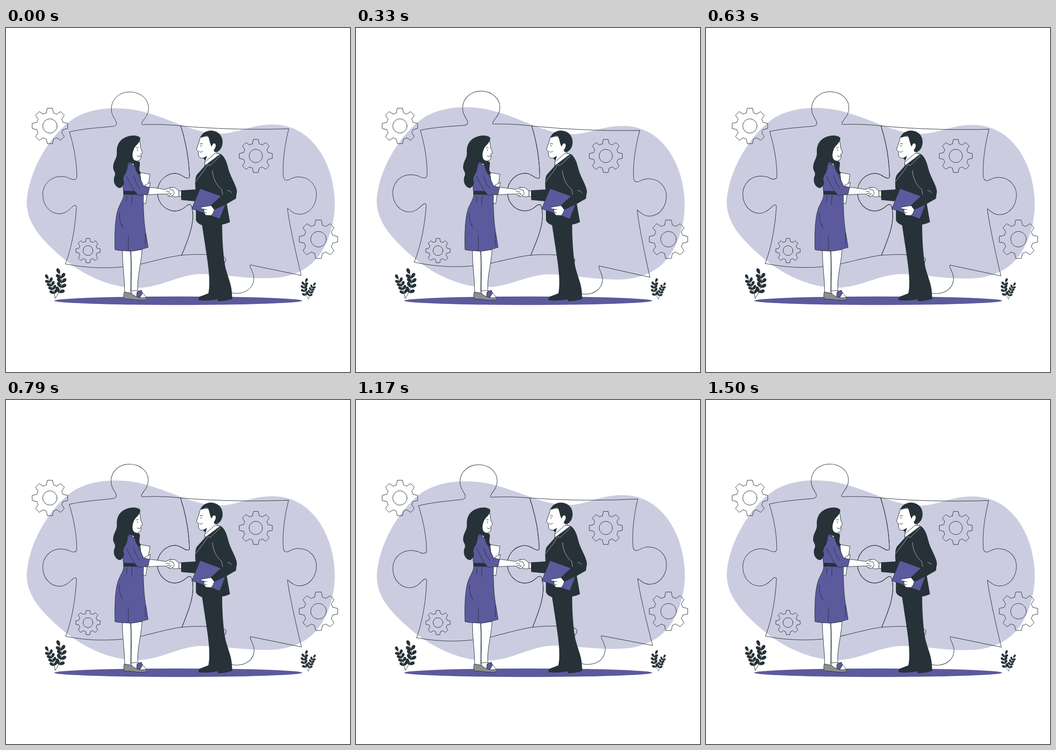
These frames come from a looping animation (748 by 748 pixels, 1540 ms). An HTML page:

```html
<!DOCTYPE html>
<html lang="en">
<head>
<meta charset="utf-8">
<title>Handshake</title>
<style>
  html, body { margin: 0; width: 100%; height: 100%; overflow: hidden; background: #fff; }
  svg { display: block; width: 100%; height: 100%; }
  .line { fill: none; stroke: #263238; stroke-width: 1; stroke-linecap: round; stroke-linejoin: round; }
  .skin { fill: #fff; stroke: #263238; stroke-width: 1; stroke-linejoin: round; }
  .dark { fill: #263238; }
  .main { fill: #5b5a9d; }
  .edge { stroke: #263238; stroke-width: 1; stroke-linejoin: round; }
  .pale { fill: none; stroke: #d5d5e4; stroke-width: .8; stroke-linecap: round; }
</style>
</head>
<body>
<svg viewBox="0 0 748 748">
  <path id="blob" fill="#cbcce0" d="M45 380C48 310 98 228 150 195C180 178 225 168 285 179C350 193 395 223 450 229C500 234 525 210 580 210C650 210 690 265 706 320C718 365 717 400 708 435C690 500 655 535 590 543C530 548 470 534 420 535C370 538 330 568 275 565C218 562 162 533 121 498C75 458 46 425 45 380Z"/>

  <g id="puzzle" class="line">
    <path d="M138 226C165 219 200 217 232 214Q242 213 240 205C236 195 229 190 229 175C230 153 248 139 269 139C292 139 310 154 310 174C310 190 300 197 296 205Q293 211 299 210C325 209 355 210 380 213"/>
    <path d="M138 226C149 262 154 295 154 323C154 331 146 331 138 327C131 323 124 323 117 323C96 324 80 341 80 362C80 386 96 404 117 404C134 403 141 390 148 386Q154 384 153 391C151 430 143 478 129 513C190 525 245 523 290 514C322 507 350 498 382 494"/>
    <path id="seam" d="M380 213C392 250 398 290 399 322C399 329 393 327 386 323C380 319 374 316 367 316C346 317 329 335 329 357C330 381 347 398 368 398C385 397 391 386 397 384Q402 382 404 389C412 420 398 455 382 494"/>
    <use href="#seam"/>
    <path d="M380 213C450 219 530 222 615 219C606 253 601 292 603 322C604 332 610 333 617 329C625 325 632 323 639 324C660 325 675 342 675 362C675 386 659 405 638 405C625 405 618 396 612 392C614 415 629 485 642 538L531 515C528 520 539 530 539 545C538 565 522 577 500 577C475 576 460 560 460 540C461 520 480 512 478 502C474 491 415 491 382 494"/>
  </g>

  <g id="gears" class="line"></g>
  <ellipse class="main" cx="374.500" cy="593" rx="269.500" ry="9.200"/>
  <g id="plants"></g>

  <g id="woman">
    <path class="skin" d="M253 484C253 515 258 545 258 574L272 579C274 548 272 515 272 484ZM270 484C274 515 270 545 271 573L287 574C284 545 293 520 296 482Z"/>
    <path class="edge" fill="#8d8d91" d="M257 574C256 579 255 585 258 589L273 590C282 591 296 593 304 591Q308 588 304 585C292 588 281 582 275 577Z"/>
    <path class="skin" d="M271 573C281 569 291 571 297 576L305 585C294 590 280 584 274 578Z"/>
    <path class="main edge" d="M285 574L294 570L297 576L291 586L284 583Z"/>
    <path class="skin" d="M290 314L313 318L304 382L287 379Z"/>
    <path class="skin" d="M302 342L309 338L314 336L312 345L315 349L303 350Z"/>
    <path class="main edge" d="M266 291C278 293 286 299 289 308C294 321 292 338 298 355L299 364C298 390 300 430 305 452L309 477C291 482 280 486 266 485C252 484 245 484 237 482C236 445 237 405 247 386C251 377 256 370 256 361L253 333C252 312 258 300 266 291Z"/>
    <path class="dark" d="M256 354L298 355L299 363L255 362Z"/>
    <path class="line" d="M247 402C246 415 248 426 255 435M249 425L253 429M266 452L266 483M303 446L303 472M263 365L262 378M274 364L273 384"/>
    <path class="skin" d="M307 346C324 347 337 350 348 351L357 346L368 354L367 362L357 367L347 361C335 361 319 362 302 363Z"/>
    <path class="main edge" d="M266 296C278 293 283 303 288 319L299 343L312 347L309 361L288 364C277 354 270 338 262 322"/>
    <path class="line" d="M277 321L284 339L291 349"/>
    <path class="skin" d="M274 285L275 299Q282 298 287 288L290 288Q294 284 294 279L293 274L297 271L293 261L291 246L270 250Z"/>
    <path class="dark" d="M292 239C288 234 276 232 264 236C248 241 240 254 241 270C242 283 234 288 233 301C232 310 238 311 237 320C232 330 235 341 242 346Q249 351 253 344Q259 338 255 330C255 319 262 317 263 308C266 302 263 297 267 293C275 291 280 297 281 306Q284 315 288 318Q293 320 293 314C287 309 292 302 291 292Q288 289 281 288C274 285 274 274 277 266C280 254 292 252 292 239Z"/>
    <path class="line" d="M283 261Q286 259 288 260M286 264L286 267M285 278Q289 281 293 278"/>
  </g>

  <g id="man">
    <path class="skin" d="M423 236L419 250L414 264L418 268L419 278Q421 284 428 283L433 284L432 301L458 283L460 259L451 235Z"/>
    <path class="dark" d="M423 238C425 230 434 223 446 223C462 224 471 234 471 248C471 259 465 269 456 270Q449 268 454 262C457 257 455 250 450 252L447 258C443 251 443 243 439 235C434 232 429 239 423 238ZM428 283L437 278L434 288Z"/>
    <path fill="#fff" d="M450 252Q456 249 456 256Q455 263 450 263Z"/>
    <path class="line" d="M422 252Q425 250 428 252M424 255L424 258M420 268Q423 272 428 268"/>
    <path class="dark" d="M425 420L470 426C470 465 473 500 477 520C482 541 490 556 491 574L492 589Q477 594 461 594L460 590Q440 594 419 592Q416 585 427 582L440 577C445 553 440 520 436 492Z"/>
    <path class="dark" d="M467 274C476 280 480 292 483 304C487 322 500 340 502 354C502 371 490 376 480 382L487 422C474 428 455 432 430 430Q416 426 413 418L413 377L381 374L381 353L412 351C411 335 411 326 415 319L432 300Z"/>
    <path class="skin" d="M432 292L455 272L466 274L433 299Z"/>
    <path class="main edge" d="M422 349L482 371L465 415L404 393Z"/>
    <path class="dark" d="M470 363L445 386L454 395L479 383L500 371L502 354L486 350Z"/>
    <path class="skin" d="M446 386L434 388L423 390Q423 393 431 394L430 400L434 407L446 408Q451 403 453 395Z"/>
    <path class="line" d="M431 394L437 395M431 400L436 402"/>
    <path class="pale" d="M412 334L430 311L439 297L444 299L466 278M449 310C450 324 455 340 469 351L471 362M482 353Q488 354 491 358"/>
    <path class="skin" d="M376 354L381 354L381 367L376 366Z"/>
    <path class="skin" d="M376 354L367 347Q359 345 355 350Q358 353 363 352L366 359L362 365Q367 369 376 366Z"/>
    <path class="line" d="M348 356Q352 353 356 357M349 361Q353 357 358 361M354 365L360 360"/>
  </g>
</svg>
<script>
const $ = id => document.getElementById(id);
const xy = (cx, cy, r, a) => `${(cx + r * Math.cos(a)).toFixed(2)} ${(cy + r * Math.sin(a)).toFixed(2)}`;

// Eight tapered teeth joined by short arcs
function gear(cx, cy, r) {
  const v = r * .755, tip = .145, root = .27;
  let d = '';
  for (let i = 0; i < 8; i++) {
    const a = i * Math.PI / 4 - Math.PI / 2;
    d += `${i ? `A${v} ${v} 0 0 1 ` : 'M'}${xy(cx, cy, v, a - root)}L${xy(cx, cy, r, a - tip)}` +
         `L${xy(cx, cy, r, a + tip)}L${xy(cx, cy, v, a + root)}`;
  }
  d += `A${v} ${v} 0 0 1 ${xy(cx, cy, v, -Math.PI / 2 - root)}Z`;
  return `<path d="${d}"/><circle cx="${cx}" cy="${cy}" r="${r * .4}"/>`;
}

// Leaf pairs along a quadratic stem that starts at 0,0
function branch(bx, by, ex, ey, pairs, size) {
  const leaf = (x, y, a, l) =>
    `<path d="M0 0C${l * .3} ${-l * .36} ${l} ${-l * .36} ${l} 0C${l} ${l * .36} ${l * .3} ${l * .36} 0 0" transform="translate(${x} ${y}) rotate(${a})"/>`;
  let out = `<path d="M0 0Q${bx} ${by} ${ex} ${ey}" fill="none" stroke="#263238"/>`;
  for (let i = 0; i <= pairs; i++) {
    const t = .22 + .78 * i / pairs, u = 1 - t;
    const x = 2 * u * t * bx + t * t * ex, y = 2 * u * t * by + t * t * ey;
    const a = Math.atan2(u * by + t * (ey - by), u * bx + t * (ex - bx)) * 180 / Math.PI;
    if (i === pairs) out += leaf(x, y, a, size);
    else for (const s of [-1, 1]) out += leaf(x, y, a + s * 45, size);
  }
  return out;
}
const plant = branch(21, -30, 10, -53, 4, 13.5) + branch(-4, -24, -15, -42, 4, 11.5);

$('gears').innerHTML = [[95.5, 213, 39], [543.2, 278.2, 36.3], [178.3, 484, 26.7], [679.5, 459.3, 42.2]].map(g => gear(...g)).join('');
$('plants').innerHTML =
  `<g class="dark" transform="translate(107 588)">${plant}</g>` +
  `<g class="dark" transform="translate(658 590) scale(-.7 .7)">${plant}</g>`;

// Sway in degrees, linear between steps
const LOOP = 1540, FPS = 24, REST = .066;
const sway = [[0, REST], [355, 1], [1115, -1], [LOOP, REST]];

function angle(t) {
  const i = sway.findIndex(s => s[0] > t);
  const [t0, a0] = sway[i - 1], [t1, a1] = sway[i];
  return a0 + (a1 - a0) * (t - t0) / (t1 - t0);
}

const start = performance.now();
function draw(now) {
  const t = Math.max(0, now - start) % LOOP;
  const held = Math.min(36, Math.floor((t + 5) * FPS / 1000)) * 1000 / FPS;
  const a = angle(held) - REST;
  $('blob').setAttribute('transform', `rotate(${a} 380 370)`);
  $('puzzle').setAttribute('transform', `rotate(${a} 378 358)`);
  requestAnimationFrame(draw);
}
draw(start);
</script>
</body>
</html>
```
